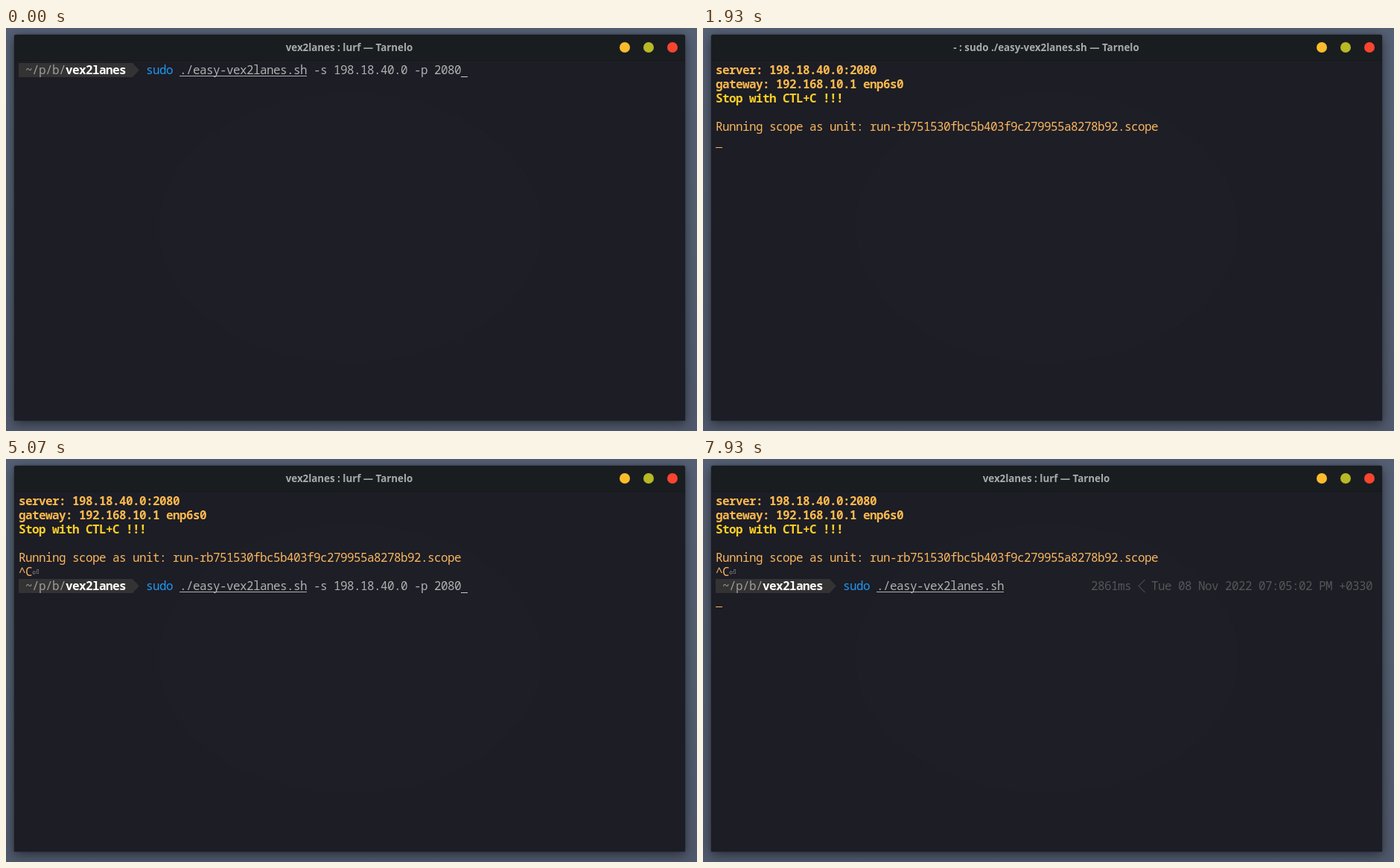
An HTML page for the animation above (8000 ms loop, 928 px wide and 541 px high).

```html
<!DOCTYPE html>
<html lang="en">
<head>
<meta charset="utf-8">
<title>Terminal session</title>
<style>
  html, body { margin: 0; width: 100%; height: 100%; overflow: hidden; }
  body { background: linear-gradient(#566075, #535f70 45%, #50596d); }
  #window {
    position: absolute; left: 11px; top: 9px; width: 901px; height: 518px;
    border-radius: 3px 3px 0 0; background: #1c1d25;
    box-shadow: 0 4px 16px rgba(0, 0, 0, .5), 0 0 2px rgba(0, 0, 0, .5);
  }
  svg { position: absolute; left: 0; top: 0; width: 928px; height: 541px; }
  /* Terminal cells are 9px wide */
  text {
    font: 16px "Noto Sans Mono", "DejaVu Sans Mono", monospace;
    letter-spacing: calc(9px - .6em);
    white-space: pre; font-variant-ligatures: none;
  }
  .bold { font-weight: 700; }
  #title {
    font: 700 13.33px "Noto Sans", sans-serif; letter-spacing: 0;
    fill: #a9abab; text-anchor: middle;
  }
</style>
</head>
<body>
<div id="window"></div>
<svg viewBox="0 0 928 541">
  <ellipse cx="462" cy="268" rx="258" ry="181" fill="#1d1e26"/>
  <path d="M11 43V12q0-3 3-3H909q3 0 3 3V43z" fill="#191d20"/>
  <path d="M11 43.5H912" stroke="#15181b"/>
  <text id="title" x="461" y="31"></text>
  <circle cx="831" cy="26" r="7" fill="#fdbc2c"/>
  <circle cx="863" cy="26" r="7" fill="#b8b924"/>
  <circle cx="895" cy="26" r="7" fill="#f9442f"/>

  <g id="header" fill="#fdb94d">
    <text class="bold" x="17" y="62">server: 198.18.40.0:2080</text>
    <text class="bold" x="17" y="81">gateway: 192.168.10.1 enp6s0</text>
  </g>
  <g id="running" fill="#fab65f">
    <text class="bold" x="17" y="100" fill="#ffcf27">Stop with CTL+C !!!</text>
    <text x="17" y="138">Running scope as unit: run-rb751530fbc5b403f9c279955a8278b92.scope</text>
  </g>
  <text id="interrupt" x="17" y="157" fill="#fab65f">^C</text>
  <text id="newline" x="35" y="157" fill="#909090">⏎</text>

  <!-- The prompt is laid out on the first terminal row -->
  <g id="prompt">
    <path d="M17 47H170L179 56.5L170 66H17z" fill="#333"/>
    <text x="26" y="62" fill="#9c9c9c">~/p/b/</text>
    <text class="bold" x="80" y="62" fill="#fff">vex2lanes</text>
    <g id="command" fill="#b0b0b0">
      <text x="188" y="62" fill="#1f98f3">sudo</text>
      <text x="233" y="62">./easy-vex2lanes.sh</text>
      <rect x="233" y="64" width="171" height="1"/>
      <text id="options" x="404" y="62"></text>
    </g>
    <g id="status" fill="#565656">
      <text x="521" y="62">2861ms</text>
      <path d="M593.5 48L585 56.5L593.5 65" fill="none" stroke="#626262"/>
      <text x="602" y="62">Tue 08 Nov 2022 07:05:02 PM +0330</text>
    </g>
  </g>
  <rect id="cursor" width="9" height="1"/>
</svg>
<script>
const LOOP = 8000, CELL = 9, ROW = 19, LEFT = 17, TOP = 47;
const COMMAND_COL = 19, OPTIONS_COL = 43, END_COL = 66, STATUS_COL = 56;
const OPTIONS = " -s 198.18.40.0 -p 2080";
const SHELL_TITLE = "vex2lanes : lurf — Tarnelo";
const SCRIPT_TITLE = "- : sudo ./easy-vex2lanes.sh — Tarnelo";
const $ = id => document.getElementById(id);
const show = (id, on) => $(id).setAttribute("display", on ? "inline" : "none");

// Column where the command line ends, as it is recalled and then erased
function inputColumn(t) {
  if (t < 1470) return END_COL;
  if (t < 5070) return COMMAND_COL;
  if (t < 5530) return END_COL;
  if (t < 6070) return 65;
  if (t < 6670) return 63 - 2 * Math.floor((t - 6060) / 66.7);
  if (t < 6870) return 46;
  return t < 7070 ? 45 : 44;
}

function placeCursor(col, row, color) {
  const cursor = $("cursor");
  cursor.setAttribute("x", LEFT + col * CELL);
  cursor.setAttribute("y", TOP + row * ROW + ROW - 1);
  cursor.setAttribute("fill", color);
}

function draw(t) {
  const atStart = t < 1470, returned = t >= 4330;
  const atPrompt = atStart || returned;
  const col = inputColumn(t), row = atStart ? 0 : 6;

  $("title").textContent = t >= 1930 && t < 4670 ? SCRIPT_TITLE : SHELL_TITLE;
  show("header", !atStart);
  show("running", t >= 1530);
  show("interrupt", t >= 4070);
  show("newline", returned);

  show("prompt", atPrompt);
  $("prompt").setAttribute("transform", `translate(0 ${row * ROW})`);
  show("command", col > COMMAND_COL);
  show("status", returned && col < STATUS_COL);
  $("options").textContent = OPTIONS.slice(0, Math.max(0, col - OPTIONS_COL));

  show("cursor", atStart || t >= 1530);
  if (t >= 7930) placeCursor(0, 7, "#fab65f");
  else if (atPrompt) placeCursor(col, row, "#ccc");
  else placeCursor(t < 4070 ? 0 : 2, 5, "#fab65f");
}

const start = performance.now();
function tick() {
  draw((performance.now() - start) % LOOP);
  requestAnimationFrame(tick);
}
tick();
</script>
</body>
</html>
```
